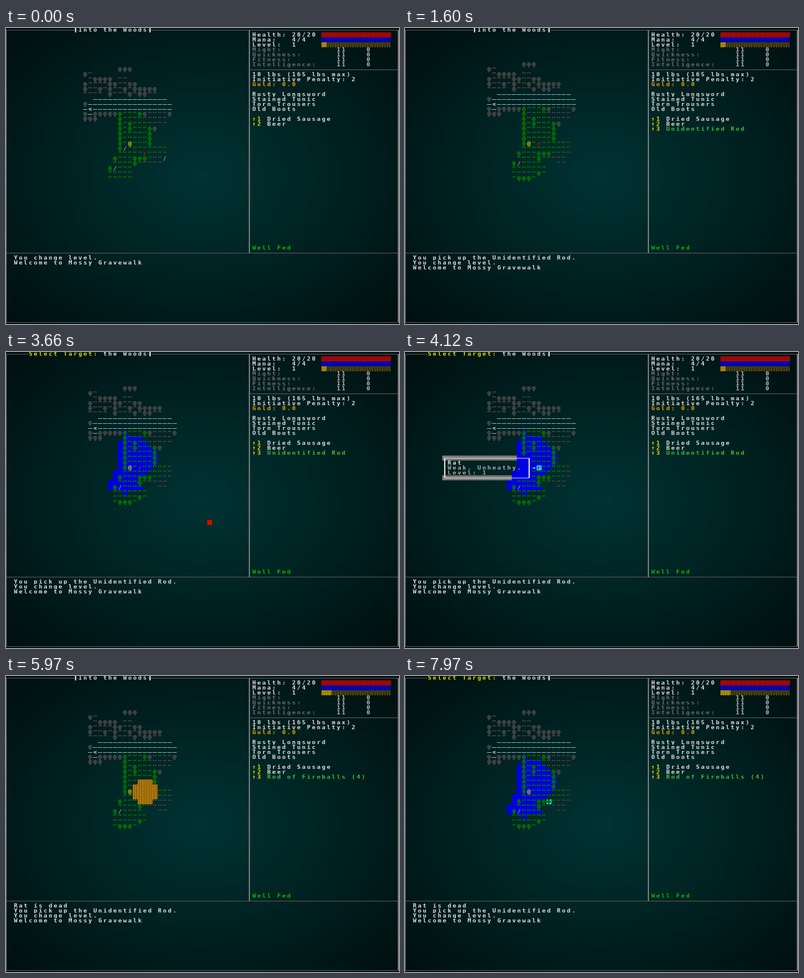
Write an HTML page with a canvas that moves like this. It is 633 px wide and 478 px high and loops after 8000 ms.

```html
<!DOCTYPE html>
<html lang="en">
<head>
<meta charset="utf-8">
<title>Into the Woods</title>
<style>
  html, body { margin: 0; width: 100%; height: 100%; overflow: hidden; }
  body { background: radial-gradient(rgb(0, 51, 51), rgb(0, 15, 15)); }
  canvas { display: block; }
</style>
</head>
<body>
<canvas id="screen" width="633" height="478"></canvas>
<script>
const ctx = document.getElementById('screen').getContext('2d');
const WHITE = '#ffffff', GREY = '#999999', YELLOW = '#ffff00', RED = '#ff0000',
  BLUE = '#0000ff', CYAN = '#00ffff', GOLD = '#ffc800', GREEN = '#008a00',
  FADED = '#606060', ROAD = '#c0f0f0', ROD = '#f9a0b0', LOOT = '#60e060';

// Tile map, top left at column 17, row 7. Capital and comma are in view, t and dot remembered.
const MAP_COL = 17, MAP_ROW = 7;
const MAP = [
  '       ttt',
  't.',
  ' .tttt ..',
  't....tt..tt',
  't..t.t..t.ttttt',
  '.... t...t.tt..',
  '  ===============',
  't=================',
  '=<================',
  't=tttttT,,,Tt....t',
  'ttt    T.,,,.....',
  '       T,T,,,....',
  '       T,T,,,Tt',
  '       T,,,,,T',
  '       T,,,,,T',
  '       T,,,,,T',
  '       T,,,,,,,,.',
  '       ,,,,,,,,,.',
  '      T,,,TTT,...',
  '      ,,,,T,....',
  '     T,,,,,   ..',
  '     ,,,,,,,',
  '     ,,,,,T,',
  '     ,TTT,'
];

// First and last column in range, from row 16 down.
const RANGE = [[24, 24], [24, 27], [23, 28], [23, 29], [23, 30], [23, 30], [23, 30],
  [23, 29], [22, 28], [22, 26], [21, 26], [21, 27], [24, 24]];

const TREE = [[2, 0, 3, 1], [1, 1, 5, 1], [2, 2, 3, 1], [0, 3, 7, 2], [1, 5, 2, 1],
  [4, 5, 2, 1], [3, 5, 1, 2], [2, 7, 3, 1]];
const GRASS = [[1, 0, 2, 3], [4, 0, 2, 3]];
const DASH = [[0, 4, 7, 1]];
const TILES = {
  T: [TREE, GREEN], t: [TREE, FADED],
  ',': [GRASS, GREEN], '.': [GRASS, FADED],
  '=': [DASH, ROAD]
};

// Mouse cell over time: [ms, column, row].
const MOUSE = [[2990, 69, 53]];
for (let i = 1; i <= 6; i++) {
  MOUSE.push([3308 + 72 * i, 69 - 7 * i, Math.round(53 - 28 * i / 6)]);
}
MOUSE.push([3900, 26, 24], [4040, 26, 23], [4120, 27, 23], [5280, 28, 23],
  [7830, 29, 27], [7970, 29, 25]);

const inks = {};
let aiming = false;

// Every second line of the screen is darker.
function ink(hex) {
  if (!inks[hex]) {
    const tile = document.createElement('canvas');
    tile.width = 1;
    tile.height = 2;
    const g = tile.getContext('2d');
    const rgb = [1, 3, 5].map(i => parseInt(hex.slice(i, i + 2), 16));
    [0, 64].forEach((dim, y) => {
      g.fillStyle = `rgb(${rgb.map(v => Math.max(0, v - dim))})`;
      g.fillRect(0, y, 1, 1);
    });
    inks[hex] = ctx.createPattern(tile, 'repeat');
  }
  return inks[hex];
}

const left = col => col * 8 - 4;
const top_ = row => row * 8 - 1;

function rect(x, y, w, h, color) {
  ctx.fillStyle = ink(color);
  ctx.fillRect(x, y, w, h);
}

function inRange(col, row) {
  const span = RANGE[row - 16];
  return span && col >= span[0] && col <= span[1];
}

function wipe(col, row, back) {
  ctx.clearRect(left(col), top_(row), 8, 8);
  if (aiming && inRange(col, row)) back = BLUE;
  if (back) rect(left(col), top_(row), 8, 8, back);
}

function letter(ch, col, row, color) {
  ctx.fillStyle = ink(color);
  ctx.fillText(ch, left(col) + 3.5, top_(row) + 7);
}

function put(text, col, row, color = WHITE) {
  [...text].forEach((ch, i) => {
    wipe(col + i, row);
    letter(ch, col + i, row, color);
  });
}

function hline(c0, c1, row, color = GREY) {
  rect(c0 * 8, row * 8 + 3, (c1 - c0) * 8, 1, color);
}

function vline(col, r0, r1, color = GREY) {
  rect(col * 8 - 1, r0 * 8 + 3, 2, (r1 - r0) * 8, color);
}

function shade(col, row, color, dense) {
  for (let y = 0; y < 8; y++) {
    for (let x = 0; x < 8; x++) {
      const dot = (x + y % 2 * 2) % 4 === 0;
      if (dot !== dense) rect(left(col) + x, top_(row) + y, 1, 1, color);
    }
  }
}

function bar(row, color, filled) {
  for (let i = 0; i < 14; i++) shade(64 + i, row, color, i < filled);
}

function tileAt(col, row) {
  return (MAP[row - MAP_ROW] || '')[col - MAP_COL] || ' ';
}

function drawTile(ch, col, row) {
  if (ch === '<') letter(ch, col, row, WHITE);
  if (!TILES[ch]) return;
  const [shape, color] = TILES[ch];
  for (const [x, y, w, h] of shape) rect(left(col) + x, top_(row) + y, w, h, color);
}

function drawFrame() {
  hline(0, 79, 0);
  hline(49, 79, 8);
  hline(0, 79, 45);
  hline(0, 79, 59);
  vline(0, 0, 59);
  vline(49, 0, 45);
  vline(79, 0, 59);
  put('Into the Woods', 15, 0);
  for (const col of [14, 29]) rect(col * 8 - 1, 0, 2, 7, WHITE);
  if (aiming) put('Select Target:', 5, 0, YELLOW);
}

function drawPanel(t) {
  put('Health: 20/20', 50, 1);
  put('Mana:   4/4', 50, 2);
  put('Level:  1', 50, 3);
  bar(1, RED, 14);
  bar(2, BLUE, 14);
  bar(3, GOLD, t < 5970 ? 1 : 2);
  ['Might:', 'Quickness:', 'Fitness:', 'Intelligence:'].forEach((name, i) => {
    put(name, 50, 4 + i, '#909090');
    put('11', 67, 4 + i, '#dddddd');
    put('0', 73, 4 + i, '#dddddd');
  });
  put('10 lbs (165 lbs max)', 50, 9);
  put('Initiative Penalty: 2', 50, 10);
  put('Gold: 0.0', 50, 11, GOLD);
  ['Rusty Longsword', 'Stained Tunic', 'Torn Trousers', 'Old Boots']
    .forEach((item, i) => put(item, 50, 13 + i));

  const pack = ['Dried Sausage', 'Beer'];
  if (t >= 1600) pack.push(t < 5970 ? 'Unidentified Rod' : 'Rod of Fireballs (4)');
  pack.forEach((item, i) => {
    put('↑' + (i + 1), 50, 18 + i, YELLOW);
    put(item, 53, 18 + i, i === 2 ? LOOT : WHITE);
  });
  put('Well Fed', 50, 44, '#00e000');
}

function drawLog(t) {
  const log = ['You change level.', 'Welcome to Mossy Gravewalk'];
  if (t >= 1600) log.unshift('You pick up the Unidentified Rod.');
  if (t >= 5970) log.unshift('Rat is dead');
  log.forEach((line, i) => put(line, 2, 46 + i));
}

function drawMap(t) {
  const start = t < 1140, shift = start ? 1 : 0;
  if (aiming) {
    RANGE.forEach(([a, b], i) => {
      for (let col = a; col <= b; col++) wipe(col, 16 + i);
    });
  } else if (t >= 5970) {
    wipe(27, 23, '#dd0000');
  }
  MAP.forEach((line, i) => [...line].forEach((ch, j) => {
    const col = MAP_COL + j, row = MAP_ROW + i;
    if (start && (row > 29 || row > 26 && col > 26)) return;
    if (start && col === 33 && row > 22 && ch === '.') ch = ',';
    drawTile(ch, col - shift, row + shift);
  }));
  put('/', 23 - shift, 27 + shift, ROD);
  if (start) {
    put('/', 24, 24, ROD);
    put('/', 32, 26, ROD);
  }
  if (t < 5970) {
    const [col, row] = start ? [28, 25] : t < 1600 ? [28, 23] : [27, 23];
    put('r', col, row, RED);
  }
  put('@', 25, 23, YELLOW);
}

function drawTooltip() {
  for (let row = 21; row <= 25; row++) {
    for (let col = 8; col <= 25; col++) {
      wipe(col, row, row === 21 || row === 25 ? GREY : null);
    }
  }
  hline(8, 25, 21, WHITE);
  hline(8, 25, 25, WHITE);
  vline(8, 21, 25, WHITE);
  vline(25, 21, 25, WHITE);
  put('Rat', 9, 22);
  put('Weak. Unheathy.', 9, 23, '#cccccc');
  put('Level: 1', 9, 24, '#cccccc');
  put('→', 26, 23);
}

function drawMouse(t) {
  const [, col, row] = MOUSE.filter(m => m[0] <= t).pop();
  const tile = tileAt(col, row);
  const valid = tile !== ' ' && Math.hypot(col - 25, row - 23) <= 6;
  rect(left(col), top_(row), 8, 8, valid ? CYAN : RED);
  if (col === 27 && row === 23) letter('r', col, row, RED);
  else drawTile(tile, col, row);
}

function drawBlast() {
  for (let y = -2; y <= 2; y++) {
    for (let x = -2; x <= 2; x++) {
      if (x * x + y * y > 5) continue;
      wipe(28 + x, 23 + y);
      shade(28 + x, 23 + y, '#ffa500', true);
    }
  }
}

function draw(t) {
  aiming = t >= 2990 && t < 5970 || t >= 7830;
  ctx.clearRect(0, 0, 633, 478);
  ctx.font = 'bold 9.5px "DejaVu Sans Mono", monospace';
  ctx.textAlign = 'center';
  drawFrame();
  drawPanel(t);
  drawLog(t);
  drawMap(t);
  if (t >= 4120 && t < 5280) drawTooltip();
  if (aiming) drawMouse(t);
  if (t >= 5970 && t < 6120) drawBlast();
}

const began = performance.now();
function tick() {
  draw((performance.now() - began) % 8000);
  requestAnimationFrame(tick);
}
tick();
</script>
</body>
</html>
```
